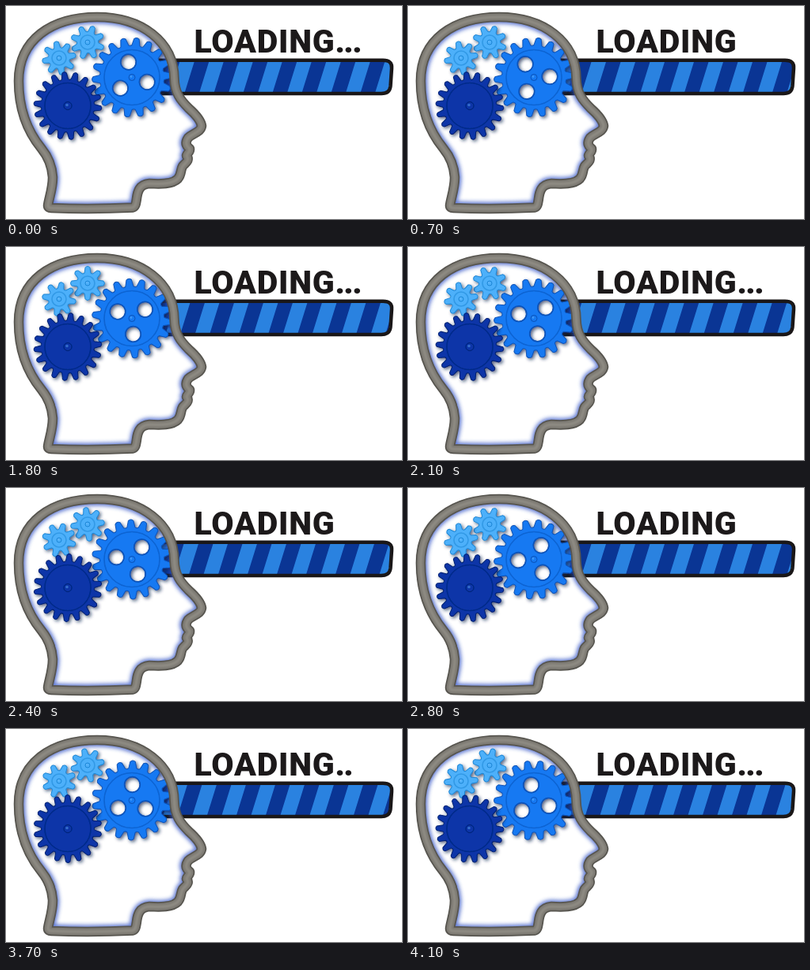
Animation, 500 px wide and 270 px high, one loop 4200 ms. Source, as an HTML page:

```html
<!DOCTYPE html>
<html lang="en">
<head>
<meta charset="utf-8">
<title>Loading</title>
<style>
  html, body { margin: 0; width: 100%; height: 100%; overflow: hidden; background: #fff; }
  svg { display: block; width: 500px; height: 270px; }
  text { font: 900 41px Roboto, "Liberation Sans", sans-serif; letter-spacing: .8px; fill: #1c191a; }
  #dots { letter-spacing: -1.6px; }
</style>
</head>
<body>
<svg viewBox="0 0 500 270">
  <defs>
    <filter id="shadow" x="-20%" y="-20%" width="150%" height="150%">
      <feDropShadow dx="2" dy="2" stdDeviation="2.2" flood-color="#14224e" flood-opacity=".7"/>
    </filter>
    <filter id="blur" x="-10%" y="-10%" width="120%" height="120%"><feGaussianBlur stdDeviation="2.6"/></filter>
    <filter id="soft"><feGaussianBlur stdDeviation="1.2"/></filter>
    <path id="head" d="M53 253 C54 244 59 232 59 217 C58 203 54 192 45 181 C27 159 16 130 16 95 C16 43 57 14 115 14 C171 14 212 45 212.500 92 C213 110 220 119 231 130 C240 138 246 145 247 152 C246 160 236 161 230 167 C226 173 227 177 232 181 C233 185 227 188 228 190 C233 196 226 199 223 203 C220 208 222 213 217 219 C210 226 195 226 181 225 C168 226 166 236 165 244 C164 250 164 254 160 255.500 Q108 258 57 256 Q53 256 53 253 Z"/>
    <clipPath id="inside"><use href="#head"/></clipPath>
    <clipPath id="tube"><path d="M193 70 H478 Q487 70 486 79 L484 103 Q483 110 475 110 H193 Z"/></clipPath>
  </defs>
  <rect width="500" height="270" fill="#fff"/>
  <g clip-path="url(#tube)">
    <rect x="190" y="66" width="300" height="48" fill="#2a82e0"/>
    <path id="stripes" fill="#0a3594"/>
  </g>
  <path d="M193 68.800 H476 Q488 68.800 487 79 L485.500 101.500 Q484.500 111 474 111 H193" fill="none" stroke="#1a1718" stroke-width="4.500"/>
  <g clip-path="url(#inside)">
    <use href="#head" fill="none" stroke="#2f50c4" stroke-width="17" opacity=".75" filter="url(#blur)"/>
  </g>
  <g id="gears"></g>
  <g fill="none" stroke-linejoin="round">
    <use href="#head" stroke="#57554f" stroke-width="12.500"/>
    <use href="#head" stroke="#7d7a73" stroke-width="9"/>
    <use href="#head" stroke="#8f8c84" stroke-width="3.500" filter="url(#soft)"/>
  </g>
  <text x="237.500" y="59">LOADING<tspan id="dots"></tspan></text>
</svg>
<script>
  const LOOP = 4200, STEP = 100;
  const CYCLE = 2100;        // dots and stripes repeat twice per loop
  const PITCH = 37;          // stripe spacing
  const TEETH_PER_LOOP = 6;  // the meshed gears all advance by this many teeth
  const $ = id => document.getElementById(id);

  const small = { r: 22, root: 14, teeth: 8, fill: "#4db0fa", edge: "#1c86d6", rim: 9, hub: 3 };
  const gears = [
    { ...small, x: 103, y: 46, phase: 19.4, dir: 1 },
    { ...small, x: 67, y: 66, phase: 34.8, dir: -1 },
    { x: 159, y: 90.5, r: 51, root: 41, teeth: 18, phase: 17, dir: -1, fill: "#1479f2", edge: "#0c52b8", rim: 35, hub: 4, holes: 3 },
    { x: 78, y: 126.5, r: 43.5, root: 34, teeth: 18, phase: 4, dir: 1, fill: "#0836a8", edge: "#041f72", rim: 29, hub: 5 }
  ];

  const polar = (r, a) => (r * Math.cos(a)).toFixed(2) + " " + (r * Math.sin(a)).toFixed(2);
  const circle = (r, attrs, x = 0, y = 0) => `<circle cx="${x}" cy="${y}" r="${r}" ${attrs}/>`;

  function gearPath({ r, root, teeth }) {
    const p = 2 * Math.PI / teeth;
    let d = "";
    for (let i = 0; i < teeth; i++) {
      const a = i * p;
      d += (i ? "L" : "M") + polar(root, a - p * .35) +
        "L" + polar(r - 2, a - p * .19) +
        "Q" + polar(r + 1, a) + " " + polar(r - 2, a + p * .19) +
        "L" + polar(root, a + p * .35) +
        "Q" + polar(root - 1.5, a + p * .5) + " " + polar(root, a + p * .65);
    }
    return d + "Z";
  }

  function gearMarkup(g) {
    let holes = "", cut = "";
    for (let i = 0; i < (g.holes || 0); i++) {
      const a = i * 2 * Math.PI / g.holes, x = 20 * Math.cos(a), y = 20 * Math.sin(a);
      cut += `M${x - 9.5} ${y}a9.5 9.5 0 1 0 19 0a9.5 9.5 0 1 0 -19 0Z`;
      holes += circle(10, `fill="none" stroke="${g.edge}" stroke-width="1.3"`, x, y);
    }
    return `<g transform="translate(${g.x} ${g.y})" filter="url(#shadow)">
      <g class="spin">
        <path d="${gearPath(g)}${cut}" fill="${g.fill}" fill-rule="evenodd" stroke="${g.edge}" stroke-width="1"/>${holes}
      </g>
      ${circle(g.rim, `fill="none" stroke="${g.edge}" stroke-width="1.6" opacity=".55"`)}
      ${circle(g.hub, `fill="${g.fill}" stroke="${g.edge}" stroke-width="1"`)}
      ${circle(g.hub * .35, `fill="#7cc0ff" opacity=".4"`, -1, -1)}
    </g>`;
  }

  $("gears").innerHTML = gears.map(gearMarkup).join("");
  const spins = document.querySelectorAll(".spin");

  const half = PITCH / 4, lean = 6.5;
  let stripes = "";
  for (let x = 463 - 9 * PITCH; x < 540; x += PITCH) {
    stripes += `M${x - half - lean} 111L${x - half + lean} 69h${PITCH / 2}L${x + half - lean} 111Z`;
  }
  $("stripes").setAttribute("d", stripes);

  function dotCount(t) {
    const p = t % CYCLE;
    return p < 300 || p >= 1800 ? 3 : Math.floor((p - 300) / 500);
  }

  function draw(ms) {
    const t = Math.floor(ms % LOOP / STEP) * STEP;
    gears.forEach((g, i) => {
      const turn = g.dir * 360 * TEETH_PER_LOOP / g.teeth * t / LOOP;
      spins[i].setAttribute("transform", `rotate(${g.phase + turn})`);
    });
    $("stripes").setAttribute("transform", `translate(${PITCH * (t / CYCLE % 1)})`);
    $("dots").textContent = ".".repeat(dotCount(t));
  }

  const start = performance.now();
  function tick() {
    draw(performance.now() - start);
    requestAnimationFrame(tick);
  }
  tick();
</script>
</body>
</html>
```
